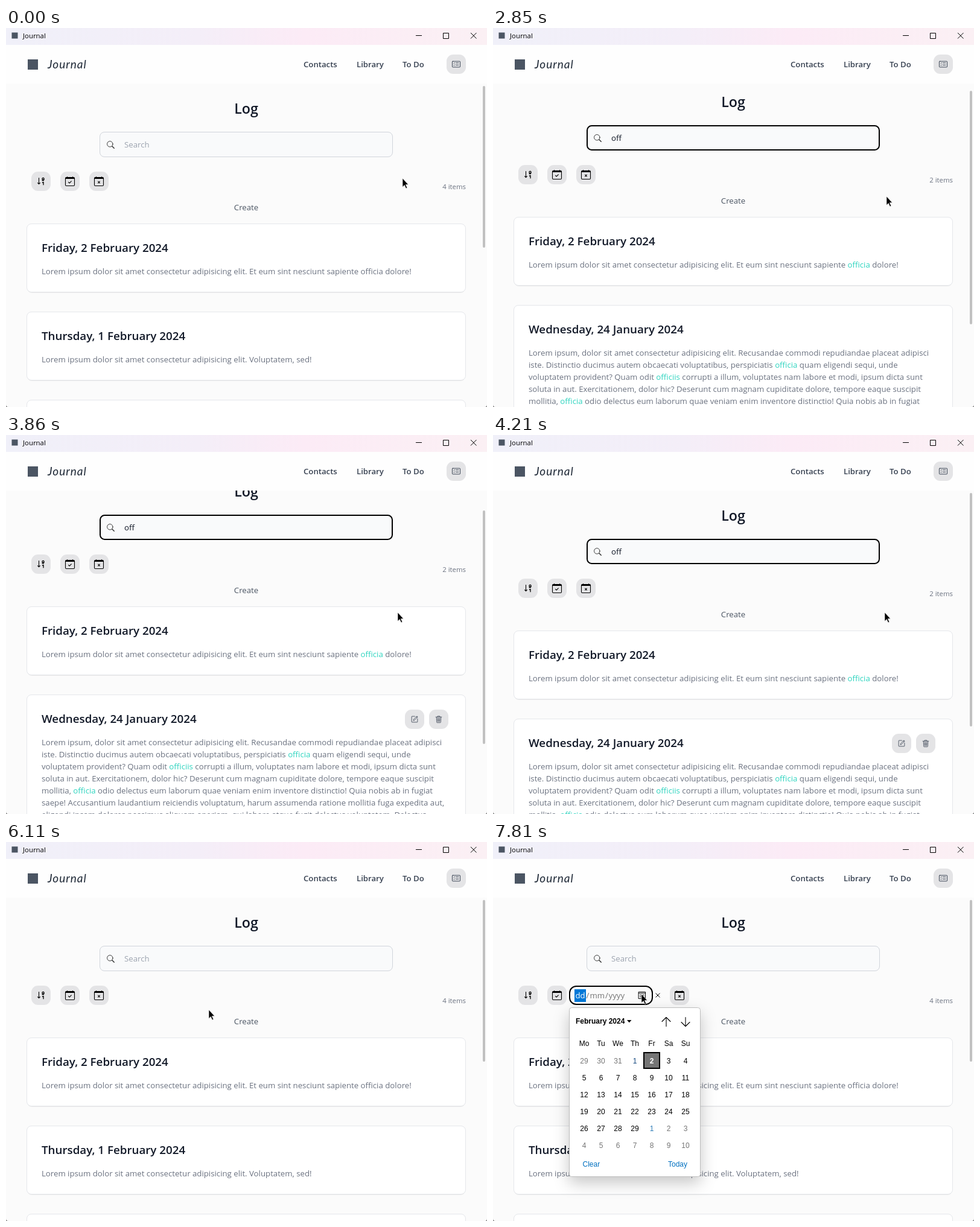
These frames come from a looping animation (797 by 628 pixels, 8 s). An HTML page:

```html
<!DOCTYPE html>
<html lang="en">
<head>
<meta charset="utf-8">
<title>Journal</title>
<style>
html, body { margin: 0; width: 100%; height: 100%; overflow: hidden; background: #fbfbfb; }
svg { display: block; width: 100vw; height: 100vh; }
text { font: 13.235px "Open Sans", "Noto Sans", sans-serif; font-variant-ligatures: none; white-space: pre; }
.body { fill: #6b7280; }
.title { font-size: 18.75px; font-weight: 600; fill: #111827; }
.nav { font-size: 13.2px; font-weight: 600; fill: #374151; }
.hit { fill: #2dd4bf; }
.mid { text-anchor: middle; }
.end { text-anchor: end; }
.cal text { font: 12px "Liberation Sans", Arial, sans-serif; }
.cal .bold { font-weight: 700; }
.line { fill: none; stroke: currentColor; stroke-linecap: round; stroke-linejoin: round; }
.pop { filter: drop-shadow(0 10px 13px rgba(0,0,0,.22)); }
</style>
</head>
<body>
<svg id="stage" viewBox="0 0 797 628"></svg>
<script>
const LOOP = 8000;
const SCROLL_MAX = 192;

// Icons are drawn on a 16 unit grid.
const calendarFrame = '<rect x=".5" y="1.5" width="15" height="14" rx="1.5"/><path d="M1 2.5h14M1 3.5h14M3.5.5v1M12.5.5v1"/>';
const icons = {
  checklist: '<rect x=".5" y="2.5" width="15" height="11" rx="1"/><path d="M7.5 5.5h5M7.5 9.5h5M3.2 6l.5.5 1.5-1.5M3.2 10l.5.5 1.5-1.5"/>',
  sort: '<path d="M4.5 2.5v10M2.5 10.6l2 2 2-2"/><path stroke-width="1.3" d="M13 4.2a1.5 1.6 0 1 1 0-.6c.2 2-.6 3.2-1.8 3.2q-.8 0-1.2-.6M10.4 10.2l1.6-.8v4.4"/>',
  check: calendarFrame + '<path d="M5.5 9.4l1.6 1.6 3.2-3.2"/>',
  cross: calendarFrame + '<path d="M6.6 8.2l2.8 2.8m0-2.8l-2.8 2.8"/>',
  search: '<circle cx="6.5" cy="6.5" r="5.8"/><path stroke-width="1.6" d="M11 11l4 4"/>',
  edit: '<path d="M8.5 1.5H2.5a1 1 0 0 0-1 1v11a1 1 0 0 0 1 1h11a1 1 0 0 0 1-1V7M5.5 10.5l.6-2.4 7-7 1.8 1.8-7 7zM11.6 2.6l1.8 1.8"/>',
  trash: '<path d="M1.5 3h13M5.5 3V1.2h5V3M3 3.5l.6 11a1 1 0 0 0 1 1h6.8a1 1 0 0 0 1-1l.6-11M5.6 5.5l.4 7.5M8 5.5V13M10.4 5.5L10 13"/>'
};

const text = (x, y, str, cls = '', extra = '') => `<text x="${x}" y="${y}" class="${cls}" ${extra}>${str}</text>`;
const icon = (name, x, y, size = 16, color = '#000') =>
  `<g class="line" style="color:${color}" transform="translate(${x} ${y}) scale(${size / 16})" stroke-width="1.1">${icons[name]}</g>`;
const button = (name, x, y, size = 16, color = '#000') =>
  `<rect x="${x}" y="${y}" width="32" height="32" rx="11" fill="#e4e4e6"/>` + icon(name, x + 16 - size / 2, y + 16 - size / 2, size, color);
const mark = str => str.replace(/\*(\w+)\*/g, '<tspan class="hit">$1</tspan>');

function card(y, height, title, lines) {
  return `<rect x="35" y="${y + 2}" width="726" height="${height - 1}" rx="8" fill="#000" opacity=".07"/>
    <rect x="34.5" y="${y + .5}" width="727" height="${height - 1}" rx="7.5" fill="#fff" stroke="#e5e7eb"/>`
    + text(59, y + 47, title, 'title')
    + lines.map((line, i) => text(59, y + 84 + 20 * i, mark(line), 'body')).join('');
}

const friday = 'Lorem ipsum dolor sit amet consectetur adipisicing elit. Et eum sint nesciunt sapiente ';
const wednesday = [
  'Lorem ipsum, dolor sit amet consectetur adipisicing elit. Recusandae commodi repudiandae placeat adipisci',
  'iste. Distinctio ducimus autem obcaecati voluptatibus, perspiciatis *officia* quam eligendi sequi, unde',
  'voluptatem provident? Quam odit *officiis* corrupti a illum, voluptates nam labore et modi, ipsum dicta sunt',
  'soluta in aut. Exercitationem, dolor hic? Deserunt cum magnam cupiditate dolore, tempore eaque suscipit',
  'mollitia, *officia* odio delectus eum laborum quae veniam enim inventore distinctio! Quia nobis ab in fugiat',
  'saepe! Accusantium laudantium reiciendis voluptatum, harum assumenda ratione mollitia fuga expedita aut,',
  'eligendi ipsam dolores possimus aliquam aperiam, qui labore atque fugit delectus voluptatem. Delectus',
  'molestiae dignissimos error ex!'
];

function calendar() {
  let out = '<rect x="126.5" y="274.5" width="217" height="280" rx="4" fill="#fff" stroke="#bdbdbd" class="pop"/>'
    + text(137, 301, 'February 2024', 'bold')
    + '<path d="M222 295h7.5l-3.75 4.2z"/>'
    + '<path class="line" stroke="#000" stroke-width="1.1" d="M287 305.5v-15m-7 7l7-7 7 7M319 290.5v15m-7-7l7 7 7-7"/>'
    + '<rect x="250" y="349" width="26" height="26" fill="#757575" stroke="#000" stroke-width="2"/>';
  ['Mo', 'Tu', 'We', 'Th', 'Fr', 'Sa', 'Su'].forEach((d, i) => { out += text(151 + 28 * i, 338, d, 'mid'); });
  for (let i = 0; i < 42; i++) {
    const inMonth = i > 2 && i < 32;
    const day = i < 3 ? 29 + i : inMonth ? i - 2 : i - 31;
    const today = i === 4;
    const color = today ? '#fff' : day === 1 ? (inMonth ? '#164a80' : '#2e7cb8') : inMonth ? '#000' : '#757575';
    out += text(151 + 28 * (i % 7), 367 + 28 * Math.floor(i / 7), day, today ? 'mid bold' : 'mid', `fill="${color}"`);
  }
  return out + text(148.5, 538, 'Clear', '', 'fill="#0070c0"') + text(322, 538, 'Today', 'end', 'fill="#0070c0"');
}

const dateField = `<rect id="dateBox" x="127" y="239" width="137" height="30" rx="11" fill="#fbfbfb"/>
  <rect id="dateSelection" x="135" y="244" width="19" height="21" fill="#0078d7"/>
  <text y="259" fill="#757575"><tspan id="dayPart" x="136.5">dd</tspan><tspan x="154.5">/</tspan><tspan x="160.5">mm</tspan><tspan x="186">/</tspan><tspan x="191.5">yyyy</tspan></text>
  <path class="line" stroke="#111" d="M241.5 248.5h11v11h-11zM241.5 250.5h11M243.5 253.5h7M243.5 256.5h7"/>
  <path class="line" stroke="#222" d="M269.8 250.8l6.4 6.4m0-6.4l-6.4 6.4"/>`;

document.getElementById('stage').innerHTML = `
  <defs>
    <linearGradient id="bar"><stop offset="0" stop-color="#f0f0f9"/><stop offset=".4" stop-color="#f4eef8"/>
      <stop offset=".62" stop-color="#fcebf6"/><stop offset="1" stop-color="#fbf0f4"/></linearGradient>
    <clipPath id="view"><rect y="92" width="797" height="536"/></clipPath>
  </defs>
  <rect width="797" height="628" fill="#fbfbfb"/>
  <g clip-path="url(#view)"><g id="page">
    ${text(398, 142, 'Log', 'title mid', 'style="font-size:23.2px"')}
    <rect id="searchBox" fill="#f9fafb"/>
    ${icon('search', 167, 187, 13, '#222')}
    <text id="query" x="196" y="198"></text>
    <rect id="caret" y="184" width="1" height="19"/>
    ${button('sort', 42, 238)}${button('check', 90, 238)}
    <g id="crossButton">${button('cross', 138, 238)}</g>
    <g id="dateField">${dateField}</g>
    <text id="count" x="762" y="267" class="body end" style="font-size:11.4px"></text>
    <rect id="createBox" x="34.5" y="278.5" width="727" height="37" rx="12" fill="#fdfdfd" stroke="#d1d5db"/>
    ${text(398, 302, 'Create', 'mid', 'fill="#4b5563"')}
    <g id="allItems">
      ${card(324, 114, 'Friday, 2 February 2024', [friday + 'officia dolore!'])}
      ${card(470, 114, 'Thursday, 1 February 2024', ['Lorem ipsum dolor sit amet consectetur adipisicing elit. Voluptatem, sed!'])}
      ${card(616, 114, '', [])}
    </g>
    <g id="foundItems">
      ${card(324, 114, 'Friday, 2 February 2024', [friday + '*officia* dolore!'])}
      ${card(470, 254, 'Wednesday, 24 January 2024', wednesday)}
      ${text(398, 794, '1', 'mid', 'style="font-size:15px" fill="#1f2937"')}
    </g>
    <g id="cardTools">${button('edit', 661, 25, 12, '#374151')}${button('trash', 701, 25, 12, '#374151')}</g>
  </g></g>
  <rect id="thumb" x="790" width="4" rx="2" fill="#c1c1c1"/>
  <rect width="797" height="28" fill="url(#bar)"/>
  <rect x="9.5" y="7.5" width="10" height="10" fill="#4b5563"/>
  ${text(28, 17, 'Journal', '', 'style="font-size:11.4px"')}
  <path fill="none" stroke="#000" d="M679 12.5h10M724.5 8.5h9v9h-9zM770 8l9.5 9.5m0-9.5l-9.5 9.5"/>
  <rect y="28" width="797" height="64" fill="#fefefe"/>
  <rect x="36" y="52" width="17" height="17" fill="#4b5563"/>
  ${text(69, 67, 'Journal', '', 'style="font:italic 19px Lato,sans-serif;letter-spacing:1px" fill="#1f2937"')}
  ${text(493, 65, 'Contacts', 'nav')}${text(581, 65, 'Library', 'nav')}${text(657, 65, 'To Do', 'nav')}
  ${button('checklist', 730, 44, 14, '#374151')}
  <path fill="#777" d="M0 624q0 4 4 4H0zM797 624q0 4-4 4h4z"/>
  <g id="calendar" class="cal">${calendar()}</g>
  <path id="arrow" d="M0 0v14.5l3.3-3.1 2.4 5.4 2.1-.9-2.4-5.3h4.3z" stroke="#fff" stroke-width=".6"/>
  <path id="hand" d="M-1 1.5Q.5-.8 2 1.5V8q2-1.2 3 .6q2-1.2 3 .6q2.4-.8 2.6 1.6v4q-.2 2.5-1.6 4.4V21H1V19.5Q-2 16-4.5 12.5q-.6-2.2 1.5-1.6L-1 13z" fill="#fff" stroke="#000" stroke-linejoin="round"/>`;

const ui = {};
document.querySelectorAll('[id]').forEach(el => { ui[el.id] = el; });
const set = (el, attrs) => { for (const k in attrs) el.setAttribute(k, attrs[k]); };
const show = (el, on) => el.setAttribute('visibility', on ? 'visible' : 'hidden');
const within = (t, a, b) => t >= a && t < b;
const mix = (a, b, p) => a + (b - a) * p;

// Progress in equal steps: the first lands at `from`, the last at `to`.
function steps(t, from, to, count) {
  if (t < from) return 0;
  return Math.min(1, (Math.floor((t - from) * (count - 1) / (to - from) + 1e-6) + 1) / count);
}

function scrollAt(t) {
  if (t < 3720) {
    const p = steps(t, 2780, 3260, 7);
    return Math.round(SCROLL_MAX * p * p * (3 - 2 * p));
  }
  return Math.round(SCROLL_MAX * (1 - steps(t, 3720, 4210, 8)) ** 3.34);
}

function pointerAt(t) {
  const along = (a, b, p) => [mix(a[0], b[0], p), mix(a[1], b[1], p)].map(Math.round);
  const rest = [657, 249], create = [649, 294], slide = [621, 299], gap = [336, 278], filter = [110, 256], picker = [246, 252];
  if (t < 5350) return along(rest, create, steps(t, 2710, 2865, 3));
  if (t < 6180) return along(slide, gap, steps(t, 5350, 6110, 11) * 1.1 - .1);
  if (t < 6850) return along(gap, filter, steps(t, 6180, 6650, 6));
  return along(filter, picker, steps(t, 6850, 7290, 7));
}

function hoveredCard(t, scroll, y) {
  if (!within(t, 2710, 4470)) return 0;
  if (t >= 3260) return 470;
  const pageY = y + scroll;
  return within(pageY, 324, 438) ? 324 : within(pageY, 470, 724) ? 470 : 0;
}

const caretTimes = [[200, 730], [990, 1720], [2250, 2780], [3310, 3840], [4420, 4950], [5420, 5960]];

function render(t) {
  const scroll = scrollAt(t);
  const [x, y] = pointerAt(t);
  const found = within(t, 1460, 4950);
  const focused = within(t, 200, 6040);
  const dateOpen = t >= 6850, picking = t >= 7740;
  const onCreate = within(t, 4470, 6110);

  set(ui.page, { transform: `translate(0 ${-scroll})` });
  set(ui.searchBox, focused
    ? { x: 156, y: 173, width: 484, height: 40, rx: 7.5, stroke: '#000', 'stroke-width': 2 }
    : { x: 155.5, y: 172.5, width: 485, height: 41, rx: 7.5, stroke: '#d1d5db', 'stroke-width': 1 });

  const typed = within(t, 990, 4750) ? 'off'.slice(0, t < 1060 ? 1 : t < 1260 ? 2 : 3) : '';
  ui.query.textContent = typed || 'Search';
  set(ui.query, { fill: typed ? '#111827' : '#9ca3af' });
  set(ui.caret, { x: [196, 204, 208, 212][typed.length], y: typed ? 183 : 184 });
  show(ui.caret, caretTimes.some(([a, b]) => within(t, a, b)));

  show(ui.allItems, !found);
  show(ui.foundItems, found);
  ui.count.textContent = (found ? 2 : 4) + ' items';
  show(ui.createBox, onCreate);
  const cardTop = hoveredCard(t, scroll, y);
  show(ui.cardTools, cardTop);
  set(ui.cardTools, { transform: `translate(0 ${cardTop})` });
  set(ui.thumb, { y: 96 + Math.round(scroll * 141 / SCROLL_MAX), height: found ? 387 : 268 });

  show(ui.dateField, dateOpen);
  set(ui.crossButton, { transform: `translate(${dateOpen ? 155 : 0} 0)` });
  set(ui.dateBox, { stroke: picking ? '#000' : '#d1d5db', 'stroke-width': picking ? 2 : 1 });
  show(ui.dateSelection, picking);
  set(ui.dayPart, { fill: picking ? '#fff' : '#757575' });
  show(ui.calendar, picking);

  const hand = onCreate || (t >= 6180 && x < 122);
  show(ui.hand, hand);
  show(ui.arrow, !hand);
  set(hand ? ui.hand : ui.arrow, { transform: `translate(${x} ${y})` });
}

const start = performance.now();
function tick() {
  render((performance.now() - start) % LOOP);
  requestAnimationFrame(tick);
}
tick();
</script>
</body>
</html>
```
